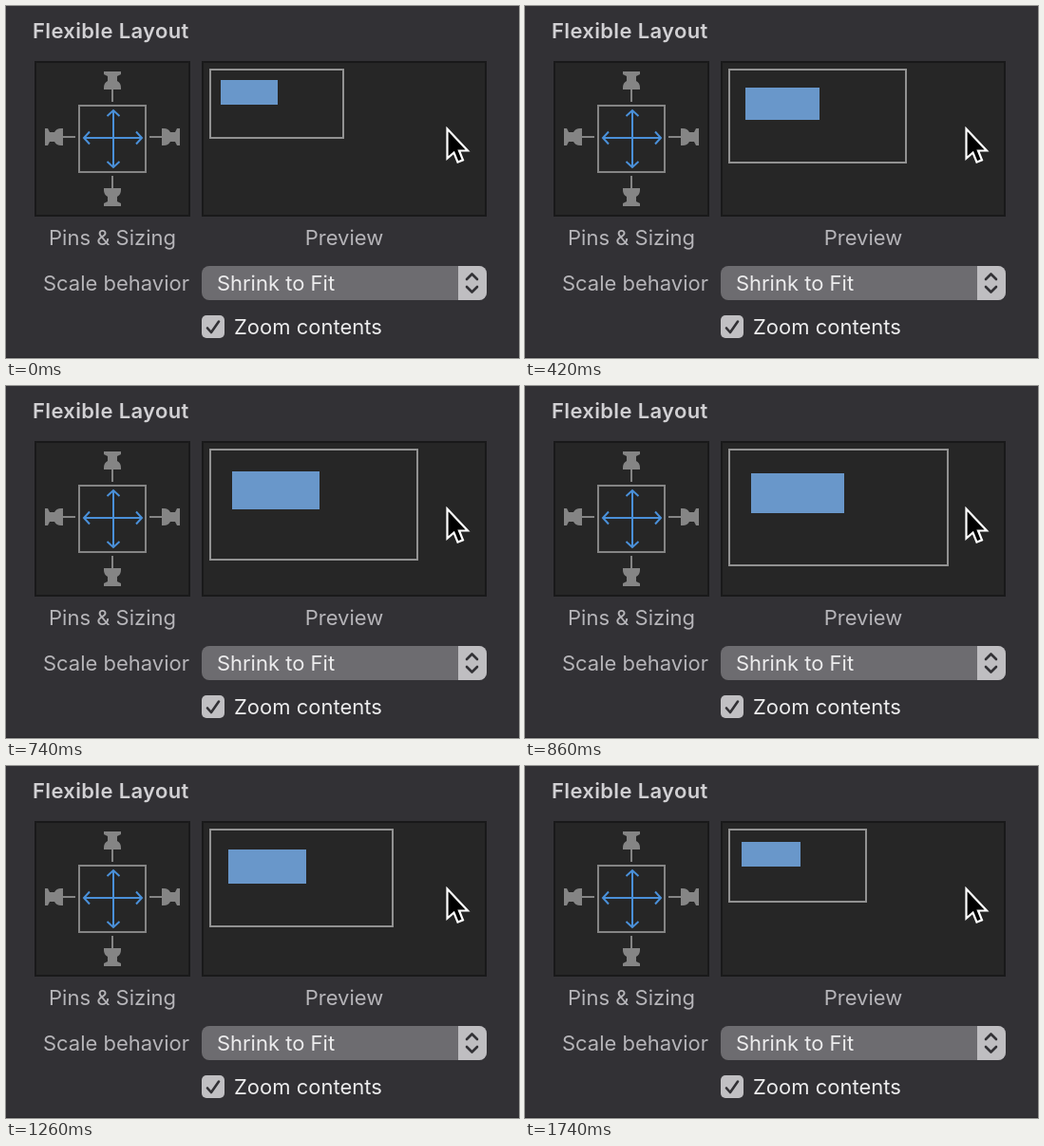
These frames come from a looping animation (540x371 px, 1.78 s). An HTML page:

```html
<!DOCTYPE html>
<html lang="en">
<head>
<meta charset="utf-8">
<title>Flexible Layout</title>
<style>
  html, body { margin: 0; width: 100%; height: 100%; overflow: hidden; background: #323135; }
  svg { display: block; width: 540px; height: 371px; }
  text { font: 400 22px Inter, Roboto, sans-serif; fill: #b6b5b9; }
  .title { font-weight: 600; letter-spacing: .35px; fill: #d1d0d3; }
  .value { fill: #ececed; }
  .well { fill: #262626; stroke: #19191a; stroke-width: 2; }
  .line { fill: none; stroke: #858585; stroke-width: 2; }
  .arrows { fill: none; stroke: #4a90d9; stroke-width: 2; }
  .mark { fill: none; stroke: #323135; stroke-width: 2.6; stroke-linecap: round; stroke-linejoin: round; }
</style>
</head>
<body>
<svg viewBox="0 0 540 371">
  <defs>
    <g id="pin">
      <path fill="#858585" d="M-9 0H9V3L5 5V10Q9 12 9 17V19H-9V17Q-9 12 -5 10V5L-9 3Z"/>
      <path class="line" d="M0 18V32"/>
    </g>
  </defs>
  <rect width="540" height="371" fill="#323135"/>
  <rect y="370" width="540" height="1" fill="#29282c"/>

  <text class="title" x="28" y="34">Flexible Layout</text>

  <rect class="well" x="31" y="59" width="162" height="162"/>
  <use href="#pin" transform="translate(112 69)"/>
  <use href="#pin" transform="translate(112 211) rotate(180)"/>
  <use href="#pin" transform="translate(41 138) rotate(-90)"/>
  <use href="#pin" transform="translate(183 138) rotate(90)"/>
  <rect class="line" x="77" y="105" width="70" height="70"/>
  <path class="arrows" d="M82 139H143M113 110V170
    M88 132.5L82 139L88 145.5M137 132.5L143 139L137 145.5
    M106.5 116L113 110L119.5 116M106.5 164L113 170L119.5 164"/>
  <text x="112" y="252" text-anchor="middle">Pins &amp; Sizing</text>

  <rect class="well" x="207" y="59" width="298" height="162"/>
  <rect id="frame" class="line" x="215" y="67" style="stroke:#929292"/>
  <rect id="block" fill="#6997ca"/>
  <text x="356" y="252" text-anchor="middle">Preview</text>

  <text x="193" y="300" text-anchor="end">Scale behavior</text>
  <rect x="206" y="274" width="300" height="36" rx="8" fill="#6d6c70"/>
  <path fill="#bfbec1" d="M476 274H498A8 8 0 0 1 506 282V302A8 8 0 0 1 498 310H476Z"/>
  <path class="mark" d="M485 288L490.500 282.500L496 288M485 296L490.500 301.500L496 296"/>
  <text class="value" x="222" y="300">Shrink to Fit</text>

  <rect x="206" y="326" width="24" height="24" rx="5" fill="#c1c0c3"/>
  <path class="mark" d="M212 339.500L216 344L224 332.500"/>
  <text class="value" x="240" y="346">Zoom contents</text>

  <path fill="#000" stroke="#fff" stroke-width="2.2"
    d="M464.500 129.500V160.500L471.500 154.500L475.500 164.500L481 162.300L477 152.500H486Z"/>
</svg>
<script>
  const LOOP = 1780, STEP = 40, LEAD = 20, SPAN = 900;
  const frame = document.getElementById('frame');
  const block = document.getElementById('block');

  function setAttrs(node, attrs) {
    for (const name in attrs) node.setAttribute(name, attrs[name]);
  }

  // Growth from 0 to 1 and back, held for each step.
  function growthAt(time) {
    if (time < LEAD) return 0;
    const t = LEAD + STEP * Math.floor((time - LEAD) / STEP);
    return Math.min(t + 22, 1778 - t) / SPAN;
  }

  // Sizes snap to whole points, two pixels each.
  function draw(time) {
    const p = growthAt(time);
    const up = (base, gain) => 2 * (base + Math.ceil(gain * p));
    const near = (base, gain) => 2 * (base + Math.round(gain * p));
    setAttrs(frame, { width: up(70, 45), height: up(36, 25) });
    setAttrs(block, {
      x: 214 + up(6, 6), y: 66 + up(6, 7),
      width: near(30, 19), height: near(13, 8.5)
    });
  }

  const start = performance.now();
  function tick() {
    draw((performance.now() - start) % LOOP);
    requestAnimationFrame(tick);
  }
  tick();
</script>
</body>
</html>
```
